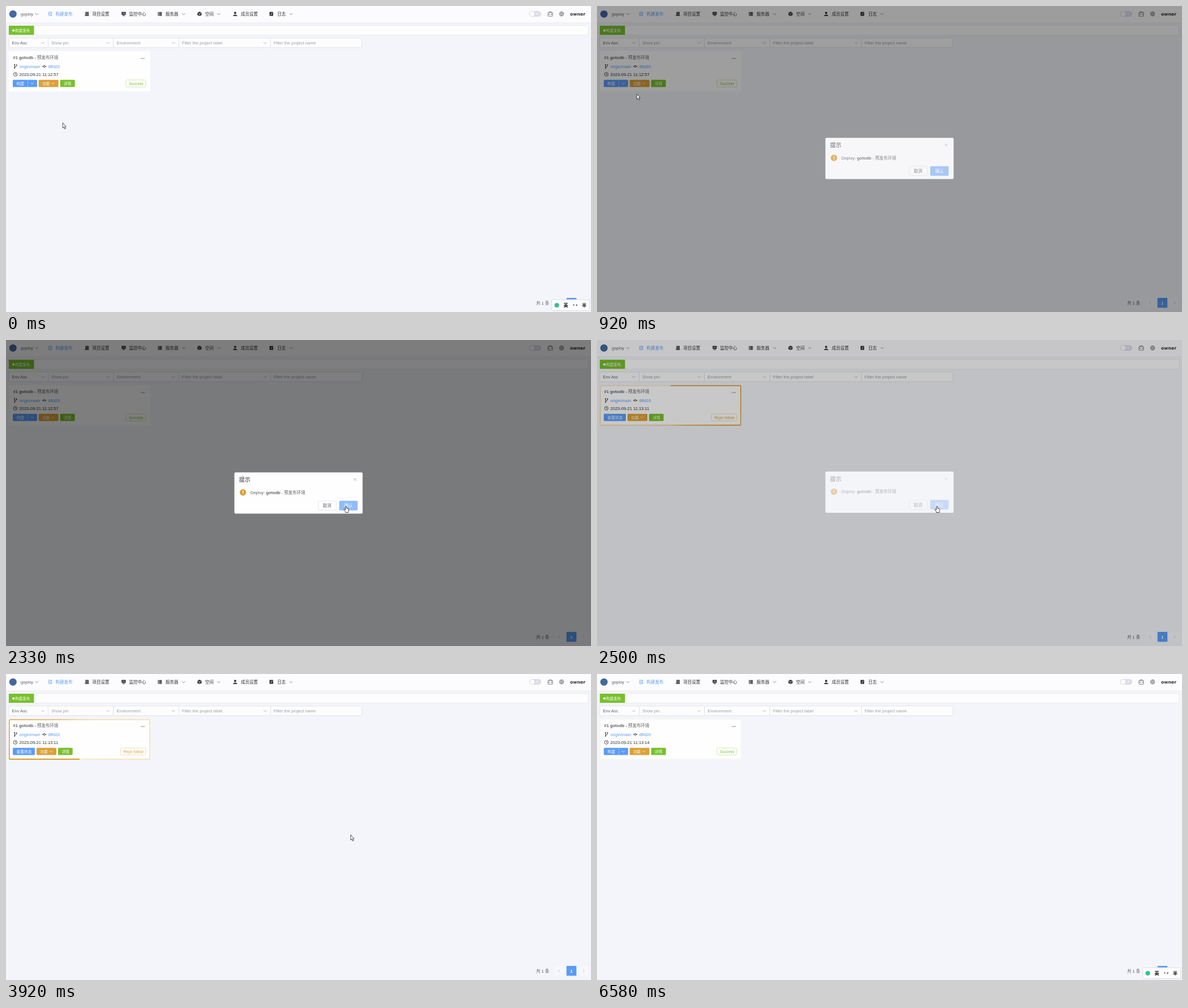
An HTML page for the animation above (6660 ms loop, 1034 by 542 pixels).

```html
<!DOCTYPE html>
<html lang="zh-CN">
<head>
<meta charset="utf-8">
<title>构建发布</title>
<style>
  html, body { margin: 0; width: 100%; height: 100%; overflow: hidden; background: #f3f5fa; }
  svg { display: block; position: absolute; left: 0; top: 0; }
  text { font-family: "Liberation Sans", "Noto Sans CJK SC", "Noto Sans CJK", sans-serif; white-space: pre; }
  #ring { width: 250px; height: 71.5px; border-radius: 2px; }
</style>
</head>
<body>
<svg id="stage" width="1034" height="542" viewBox="0 0 1034 542"></svg>
<script>
const BLUE = '#5a9cf8', ORANGE = '#dca036', GREEN = '#78c02c';
const INK = '#303133', GRAY = '#606266', HINT = '#9b9ea5', LINE = '#dcdfe6';
const LOOP = 6660, FRAME = 1000 / 12;

const text = (x, y, str, fill = INK, size = 7.5, extra = '') =>
  `<text x="${x}" y="${y}" fill="${fill}" font-size="${size}" ${extra}>${str}</text>`;
const rect = (x, y, w, h, fill, extra = '') =>
  `<rect x="${x}" y="${y}" width="${w}" height="${h}" fill="${fill}" ${extra}/>`;
const dot = (x, y, r, fill, extra = '') =>
  `<circle cx="${x}" cy="${y}" r="${r}" fill="${fill}" ${extra}/>`;
const line = (d, stroke = INK, width = 0.8, extra = '') =>
  `<path d="${d}" fill="none" stroke="${stroke}" stroke-width="${width}" ${extra}/>`;
const chevron = (x, y, stroke = HINT) => line(`M${x - 2.7} ${y - 1.3}l2.7 2.7 2.7-2.7`, stroke, 0.75);
const outline = (stroke = LINE) => `rx="1.5" stroke="${stroke}" stroke-width=".8"`;
const group = (id, body, extra = '') => `<g id="${id}" ${extra}>${body}</g>`;
const at = (x, y, body) => `<g transform="translate(${x} ${y})">${body}</g>`;

const icons = {
  build: line('M-3.5-3h4M-3.5 0h3M-3.5 3h4', BLUE, 0.9) + dot(2, -2, 1.2, 'none', `stroke="${BLUE}" stroke-width=".8"`) +
    dot(2, 2, 1.2, 'none', `stroke="${BLUE}" stroke-width=".8"`) + dot(-2, 0, 1, BLUE),
  project: rect(-2.5, -3.5, 5.5, 4.5, INK) + rect(-3.5, 1.5, 7, 2, INK) + line('M-1-2h2.5M-1-.5h2.5', '#fff', 0.6),
  monitor: rect(-3.7, -3.5, 7.4, 5.3, INK, 'rx=".7"') + rect(-2, 2.5, 4, 1.1, INK) + line('M-2.5-.6h1.5l1-1.4 1 2 .6-.8h1', '#fff', 0.6),
  server: [-3.2, -0.8, 1.6].map(y => rect(-3.5, y, 1.5, 1.8, INK) + rect(-1.5, y, 5, 1.8, INK)).join(''),
  space: '<path d="M0-4 3.7-2 3.7 2 0 4-3.7 2-3.7-2Z" fill="#303133"/>' + line('M-3.5-1.8 0 0 3.5-1.8M0 0V4', '#fff', 0.6),
  member: dot(0, -1.8, 2, INK) + '<path d="M-3.8 3.7C-3.8.3 3.8.3 3.8 3.7Z" fill="#303133"/>',
  log: rect(-3.2, -3.5, 6.4, 7, INK, 'rx=".5"') + line('M-1 2 1.5-2', '#fff', 0.9)
};

function navBar() {
  const items = [
    [78, 87.5, '构建发布', 'build'], [143, 152.5, '项目设置', 'project'], [208, 217.5, '监控中心', 'monitor'],
    [272, 282, '服务器', 'server', 314], [342, 352, '空间', 'space', 376],
    [405, 415, '成员设置', 'member'], [469, 479.5, '日志', 'log', 504]
  ];
  return rect(0, 0, 1034, 29.5, '#fcfcfe') + rect(0, 29.5, 1034, 1, '#eceef3') +
    dot(12.3, 14.2, 6.5, '#45699f') + text(26, 16.8, 'goploy', GRAY) + chevron(54.5, 14.2, GRAY) +
    items.map(([ix, x, label, icon, arrow]) => at(ix, 14, icons[icon]) +
      text(x, 17, label, icon === 'build' ? BLUE : INK) + (arrow ? chevron(arrow, 14.2, GRAY) : '')).join('') +
    rect(924.5, 9, 21.5, 10, '#dcdde8', 'rx="5"') + dot(930, 14, 4, '#fff') +
    line('M937 14.3h4M938 12.8h3', '#fff', 0.7) +
    line('M958 11.5h8v6.5h-8ZM960.5 11.5v-1.5h3v1.5M958 14.5h2.5M963.5 14.5h2.5M960.5 13.7v1.6M963.5 13.7v1.6', GRAY, 0.8) +
    at(982, 14, dot(0, 0, 3.8, 'none', `stroke="${GRAY}" stroke-width=".8"`) +
      line('M-3.8 0h7.6M0-3.8v7.6M0-3.8C-2.5-1.5-2.5 1.5 0 3.8 2.5 1.5 2.5-1.5 0-3.8', GRAY, 0.6)) +
    `<text x="997" y="17" fill="#303133" font-size="7.75" font-weight="700" style="font-family:'DejaVu Sans',sans-serif">owner</text>`;
}

function filters() {
  const fields = [[5, 69.5, 'Env Asc', 1], [74.5, 115.5, 'Show pin', 1], [190, 115.5, 'Environment', 1],
    [305.5, 162, 'Filter the project label', 1], [467.5, 161.5, 'Filter the project name', 0]];
  return rect(5, 34.7, 1024, 17, '#fdfdfe', outline('#e4e7ed')) + rect(5, 35, 44.5, 16, GREEN) +
    dot(13.2, 43.3, 2.1, '#fff') + text(16.3, 45.7, '构建发布', '#fff', 6.5) +
    fields.map(([x, w, label, arrow], i) => rect(x, 56.7, w, 17, '#fdfdfe', outline()) +
      text(x + 5.5, 68, label, i ? HINT : GRAY) + (arrow ? chevron(x + w - 9.5, 65.5) : '')).join('');
}

const button = (x, w, label, fill, arrow) => rect(x, 130.7, w, 12.8, fill, 'rx="1.5"') +
  text(x + 6.4, 139.6, label, '#fff', 6.75) + (arrow ? chevron(arrow, 137, '#fff') : '');
const tag = (x, label, fill, border) => rect(x, 131, 247 - x, 12.3, '#fefefe', outline(border)) +
  text(x + 5.2, 139.5, label, fill, 6.75);

function card() {
  return rect(5, 80, 250, 71.5, '#fefefe', 'rx="2"') +
    group('snake', '<foreignObject x="5" y="80" width="250" height="71.5"><div id="ring"></div></foreignObject>' +
      rect(6.7, 81.7, 246.6, 68.1, '#fefefe')) +
    group('flash', rect(5.9, 80.9, 248.2, 69.7, 'none', `rx="1.5" stroke="${GREEN}" stroke-width="1.8"`)) +
    text(12.5, 94.3, '<tspan font-weight="700">#1 gotodb - </tspan>预发布环境', GRAY) +
    [239.3, 241.7, 244.1].map(x => dot(x, 93, 0.8, GRAY)).join('') +
    line('M15.2 104v6M15.2 108.2q3.4 0 3.4-3', INK, 0.9) + dot(15.2, 104, 1, INK) + dot(15.2, 110, 1, INK) + dot(18.6, 104.6, 1, INK) +
    text(23.7, 109.6, 'origin/main', BLUE) +
    line('M63.7 107h8', INK, 0.9) + dot(67.7, 107, 1.6, '#fefefe', 'stroke="#303133" stroke-width=".9"') +
    text(74.7, 109.6, '8ffd20', BLUE) +
    dot(16.5, 121, 3.3, 'none', 'stroke="#303133" stroke-width=".8"') + line('M16.5 119v2.2h1.8') +
    text(23.6, 123.7, '', INK, 7.5, 'id="clock"') +
    group('idle', button(12, 43, '构建', BLUE, 46.3) + line('M38.5 131v12', '#a5caff', 0.7) +
      button(57.7, 35, '功能', ORANGE, 83) + button(95.7, 26, '详情', GREEN) + tag(212, 'Success', GREEN, '#c3e3a4')) +
    group('busy', button(12, 39, '重置状态', BLUE) + button(54, 35, '功能', ORANGE, 79.5) +
      button(92, 25.7, '详情', GREEN) + tag(202.3, 'Repo follow', ORANGE, '#f1d5a3'));
}

function pager() {
  return text(937, 528.5, '共 1 条', GRAY) +
    rect(969.5, 517, 17.5, 17.5, '#f7f8fb', 'rx="1"') + line('M979 523.2l-2.6 2.6 2.6 2.6', '#b4b7be') +
    rect(990.7, 517, 17.5, 17.5, BLUE, 'rx="1"') + text(997.3, 528.5, '1', '#fff', 7.5, 'font-weight="700"') +
    rect(1012, 517, 17.5, 17.5, '#f7f8fb', 'rx="1"') + line('M1019.7 523.2l2.6 2.6-2.6 2.6', '#b4b7be');
}

const inputBar = () => rect(964.5, 520, 67, 19.5, '#fdfdfe', 'rx="2" stroke="#d2d4da" stroke-width=".8"') +
  dot(973.5, 530, 4, '#2fc48d') + text(985.5, 532.8, '英', '#111', 8, 'font-weight="700"') +
  dot(1003.5, 529.5, 0.9, '#111') + line('M1009 528.3q.4 1.8-1.4 2.8', '#111', 1.2) +
  text(1018, 532.8, '半', '#111', 8, 'font-weight="700"');

const dialog = () => rect(403.7, 234.5, 226.6, 73, '#fefefe', 'rx="2"') + text(412, 251, '提示', INK, 10) +
  line('M614.8 244.8l4.8 4.8M619.6 244.8l-4.8 4.8', HINT, 0.7) +
  dot(418.8, 270, 5.7, ORANGE) + rect(418.2, 266.6, 1.3, 4.2, '#fff') + dot(418.85, 272.6, 0.8, '#fff') +
  text(432, 272.6, 'Deploy: <tspan font-weight="700">gotodb</tspan> - 预发布环境', GRAY) +
  rect(551.7, 285, 32, 16.3, '#fefefe', outline()) + text(560, 296, '取消', GRAY) +
  rect(589, 284.7, 32.5, 17, '#8fbcfb', 'rx="1.5"') + text(597.7, 296, '确认', '#fff');

const pen = 'fill="#fff" stroke="#222" stroke-width=".8" stroke-linejoin="round"';
const cursor = () => group('arrow', `<path d="M.3 0V9.2L2.4 7.3 3.9 10.7 5.4 10 3.9 6.7H6.4Z" ${pen}/>`) +
  group('hand', `<path d="M-1 1Q0-.6 1 1V4.2L4 5Q5 5.3 4.9 6.5L4.2 9.5V11.5H-1.2V10.2L-3.8 6.8Q-4 5.5-2.6 5.8L-1 7.2Z" ${pen}/>`);

document.getElementById('stage').innerHTML = rect(0, 0, 1034, 542, '#f3f5fa') +
  navBar() + filters() + card() + pager() + group('ime', inputBar()) +
  group('overlay', rect(0, 0, 1034, 542, '#000', 'opacity=".5"') + group('dialog', dialog())) +
  group('cursor', cursor());

const el = id => document.getElementById(id);
const show = (id, on) => el(id).style.display = on ? '' : 'none';

// Linear interpolation through [frame, ...values] stops.
function track(stops, n) {
  const i = stops.findIndex(s => s[0] > n);
  if (i < 0) return stops[stops.length - 1].slice(1);
  const a = stops[i - 1], b = stops[i], k = (n - a[0]) / (b[0] - a[0]);
  return a.slice(1).map((v, j) => v + (b[j + 1] - v) * k);
}

const pointerPath = [[0, 100, 207], [2, 94, 201], [5, 44, 150], [7, 32, 140], [10, 32, 140], [11, 70, 156],
  [13, 350, 245], [15, 610, 313], [16, 661, 322], [17, 624, 307], [18, 606, 300], [19, 597, 297], [20, 597, 297],
  [21, 598, 296], [23, 601, 294], [36, 601, 294], [43, 606, 290], [47, 609, 285], [61, 609, 285],
  [63, 740, 283], [65, 882, 281], [68, 962, 115], [70, 985, 11], [71, 989, -20]];
// Overlay opacity, dialog opacity.
const fadePath = [[0, 0, 0], [9, 0, 0], [10, 0.33, 0.7], [11, 0.75, 0.95], [12, 1, 1], [28, 1, 1],
  [29, 0.84, 1], [30, 0.42, 0.93], [31, 0, 0]];
const BUSY = 30, DONE = 62;

function render(n) {
  const busy = n >= BUSY && n < DONE;
  const [x, y] = track(pointerPath, n);
  const [veil, body] = track(fadePath, n);
  const hand = n >= 18 && n < 31;

  el('cursor').setAttribute('transform', `translate(${x} ${y})`);
  show('hand', hand);
  show('arrow', !hand);
  show('ime', n < 8 || n >= 78);

  el('overlay').style.opacity = veil;
  show('overlay', veil > 0);
  el('dialog').style.opacity = body;
  el('dialog').setAttribute('transform', `translate(0 ${-20 * (1 - body)})`);

  show('busy', busy);
  show('idle', !busy);
  show('snake', busy);
  el('clock').textContent = '2023-09-21 11:' + (n < BUSY ? '12:57' : busy ? '13:11' : '13:14');
  const angle = (n - BUSY) * 180 / 17;
  el('ring').style.background = `conic-gradient(from ${angle}deg, ${ORANGE} 0 22%, #f3d59f 50%, #fcefd6 100%)`;
  el('flash').style.opacity = n < DONE ? 0 : Math.max(0, 1 - (n - DONE) / 18);
}

const start = performance.now();
function tick() {
  const t = (performance.now() - start) % LOOP;
  render(Math.min(79, Math.floor((t + 5) / FRAME)));
  requestAnimationFrame(tick);
}
tick();
</script>
</body>
</html>
```
